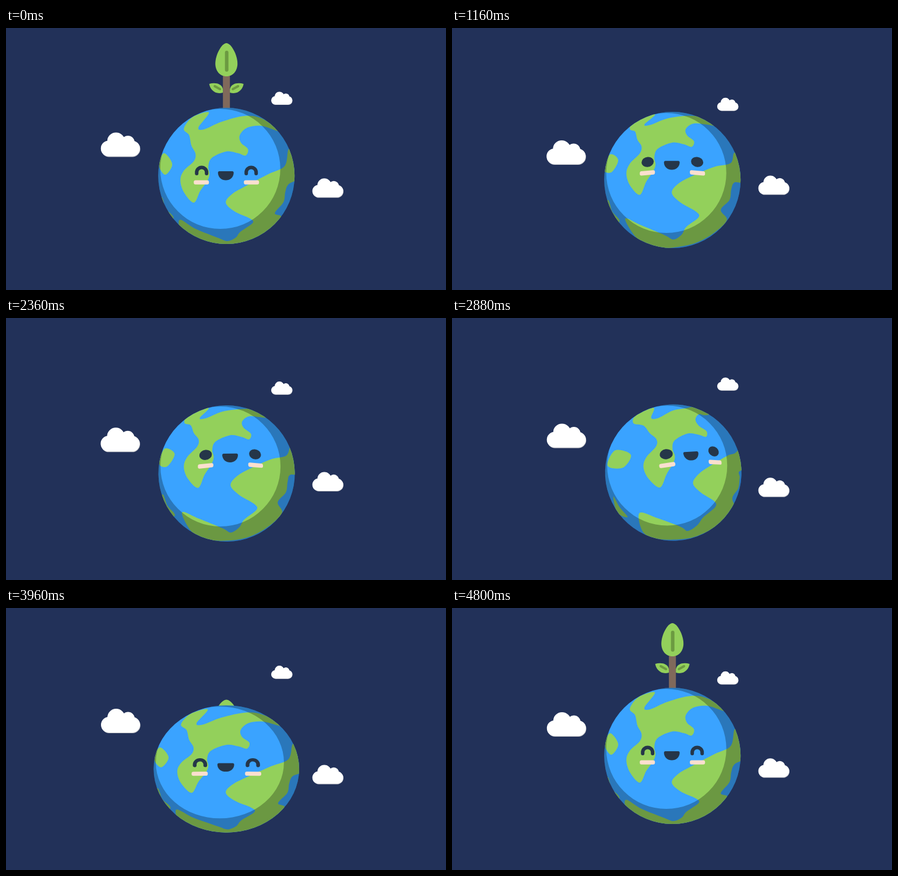
An HTML page with a canvas that plays this animation: 755x450 px, repeating every 4840 ms.

```html
<!DOCTYPE html>
<html lang="en">
<head>
<meta charset="utf-8">
<title>Happy planet</title>
<style>
  html, body { margin: 0; width: 100%; height: 100%; overflow: hidden; background: #223159; }
  canvas { display: block; }
</style>
</head>
<body>
<canvas id="stage" width="755" height="450"></canvas>
<script>
const ctx = document.getElementById('stage').getContext('2d');
const LOOP = 4840, R = 117, RAD = Math.PI / 180, TAU = 2 * Math.PI;
const GREEN = '#93d05b', DARK_GREEN = '#6c9a41', INK = '#253649';

// Coastlines as x, y pairs from the planet's centre; beyond R they lie on the far side.
const north = [-30,-109, -58,-101, -73,-81, -64,-70, -60,-52, -53,-38, -56,-25, -73,-9, -79,7,
  -73,28, -56,46, -45,26, -33,9, -29,-3, -31,-16, -25,-31, 0,-42, 20,-39, 33,-35, 37,-46,
  25,-57, 23,-70, 36,-83, 60,-86, 90,-77, 62,-98, 32,-103, -8,-93, -38,-80, -48,-83];
const south = [-1,46, 10,31, 34,17, 72,-3, 100,-17, 107,-46, 120,-36, 129,0, 107,14, 101,28,
  98,45, 83,64, 94,71, 72,94, 43,112, 10,122, -40,140, -72,115, -81,76, -53,91, -13,107,
  2,112, 16,106, 24,96, 45,81, 40,73, 14,61];
const island = [-93,-20, -105,-2, -116,-19, -107,-39];
const cape = [-114,36, -104,56, -92,74, -140,80];
const LANDS = [north, south, island, cape]
  .map(flat => flat.flatMap((x, i) => i % 2 ? [] : [[x, flat[i + 1]]]));

// Keyframes as [time, value]; every track starts and ends the loop at its rest value.
const rest = (value, ...keys) => [[0, value], ...keys, [LOOP, value]];
const height = rest(0, [560,0], [720,-29], [800,-36], [980,29], [1140,7], [1800,7.5], [2340,13],
  [2880,11.5], [3280,13], [3640,.5], [3840,47], [3920,40], [4060,-30], [4200,12], [4360,-3], [4500,0]);
const squashing = rest(0, [720,0], [980,.05], [1120,0], [3440,0], [3640,.029], [3920,.1],
  [4060,-.06], [4200,.045], [4360,-.01], [4480,0]);
const pitching = rest(0, [560,0], [840,12], [980,4], [1200,13], [3180,13], [3460,0], [3920,0],
  [4060,6], [4240,1.5], [4400,0]);
const turning = rest(0, [1160,0], [1480,-16.5], [2150,-16.5], [2520,17], [3180,17], [3460,0]);
const tilting = rest(0, [4060,0], [4240,-3], [4400,1.5], [4560,0]);
const stretching = rest(1, [560,1], [720,1.2], [800,1.35], [3920,.9], [4060,1.14], [4180,.95], [4240,1]);
const lifting = rest(0, [740,0], [920,320], [3920,-130], [4040,0]);
const drifting = rest(291.5, [720,290], [1400,285.5], [1800,286], [2880,307.5], [3640,307.5], [4240,297]);

// Smooth interpolation that never overshoots a key.
function track(keys, t) {
  let i = 0;
  while (i < keys.length - 2 && t >= keys[i + 1][0]) i++;
  const rise = j => keys[j + 1] && keys[j] ? (keys[j + 1][1] - keys[j][1]) / (keys[j + 1][0] - keys[j][0]) : 0;
  const slope = (a, b) => a * b > 0 ? 2 * a * b / (a + b) : 0;
  const [t0, v0] = keys[i], [t1, v1] = keys[i + 1], d = t1 - t0, u = (t - t0) / d;
  const m0 = slope(rise(i - 1), rise(i)) * d, m1 = slope(rise(i), rise(i + 1)) * d;
  const e = u * u * (3 - 2 * u);
  return v0 + (v1 - v0) * e + m0 * u * (1 - u) ** 2 - m1 * u * u * (1 - u);
}

// Returns a function that turns a surface point and flattens it to the disc.
function makeProjector(pitch, yaw) {
  const cp = Math.cos(pitch), sp = Math.sin(pitch), cy = Math.cos(yaw), sy = Math.sin(yaw);
  return ([px, py]) => {
    const r = Math.hypot(px, py) / R || 1e-6;
    const angle = r <= 1 ? Math.asin(r) : Math.PI / 2 + r - 1;
    const k = Math.sin(angle) / (r * R), z0 = Math.cos(angle);
    const y = py * k * cp - z0 * sp, z1 = z0 * cp + py * k * sp;
    const x = px * k * cy + z1 * sy, z = z1 * cy - px * k * sy;
    const push = z < 0 ? R * (1 - z) / Math.hypot(x, y) : R;
    return [x * push, y * push];
  };
}

function circle(x, y, r) {
  ctx.moveTo(x + r, y);
  ctx.arc(x, y, r, 0, TAU);
}

function fillSmooth(points) {
  const n = points.length, at = i => points[(i + n) % n];
  ctx.beginPath();
  ctx.moveTo(...points[0]);
  for (let i = 0; i < n; i++) {
    const [a, b, c, d] = [at(i - 1), at(i), at(i + 1), at(i + 2)];
    ctx.bezierCurveTo(b[0] + (c[0] - a[0]) / 6, b[1] + (c[1] - a[1]) / 6,
      c[0] - (d[0] - b[0]) / 6, c[1] - (d[1] - b[1]) / 6, c[0], c[1]);
  }
  ctx.fill();
}

function stroke(path, color, width) {
  ctx.strokeStyle = color;
  ctx.lineWidth = width;
  ctx.lineCap = ctx.lineJoin = 'round';
  ctx.stroke(new Path2D(path));
}

function fill(path, color) {
  ctx.fillStyle = color;
  ctx.fill(new Path2D(path));
}

function drawPlant(lift, stretch, lean) {
  ctx.save();
  ctx.translate(0, 1 - R - lift);
  ctx.rotate(lean);
  ctx.scale(1, stretch);
  fill('M-6-60H6V22H-6Z', '#80695b');
  for (const side of [-1, 1]) {
    ctx.save();
    ctx.scale(side, 1);
    fill('M6-33C8-43 20-45 29.5-42C28-32 19-23 6-27Z', GREEN);
    stroke('M11-33L20-38', DARK_GREEN, 4);
    ctx.restore();
  }
  fill('M0-112C8-112 19-92 19-77C19-64 11-55 0-55C-11-55-19-64-19-77C-19-92-8-112 0-112Z', GREEN);
  stroke('M.5-96V-66', DARK_GREEN, 6);
  ctx.restore();
}

function drawFace(mood, project) {
  const place = (x, y, draw) => {
    const [ox, oy] = project([x, y]), [ax, ay] = project([x + 1, y]), [bx, by] = project([x, y + 1]);
    ctx.save();
    ctx.transform(ax - ox, ay - oy, bx - ox, by - oy, ox, oy);
    draw();
    ctx.restore();
  };
  for (const side of [-1, 1]) {
    place(side * 43, 11, () => {
      ctx.beginPath();
      ctx.roundRect(-13, -3.6, 26, 7.4, 3);
      ctx.fillStyle = '#fbdfcf';
      ctx.fill();
    });
    place(side * 42.5, -8, () => {
      if (mood === 'happy') stroke('M-8.5 4V2A8.5 8.5 0 0 1 8.5 2V4', INK, 6);
      else if (mood === 'angry') stroke(`M${side * 13.5}-6.5L${-side * 13.5} 5.5`, INK, 6);
      else fill('M-10.5 0A10.5 9 0 0 1 10.5 0A10.5 9 0 0 1-10.5 0Z', INK);
    });
  }
  place(-1, 0, () => {
    if (mood === 'angry') stroke('M-11.5 7.5C-7-7 7-7 11.5 7.5', INK, 6);
    else fill('M-11-8H11Q13.5-8 13.5-5C13 3 7 7.5 0 7.5C-7 7.5-13 3-13.5-5Q-13.5-8-11-8Z', INK);
  });
}

function drawPlanet(t) {
  const yaw = track(turning, t), squash = track(squashing, t), tilt = track(tilting, t);
  const roll = (tilt - yaw * .2) * RAD;
  const project = makeProjector(track(pitching, t) * RAD, yaw * RAD);
  const mood = t < 860 || t >= 3940 ? 'happy' : t < 3420 ? 'puzzled' : 'angry';

  ctx.save();
  ctx.translate(378.2 + yaw * .09, 254 + track(height, t));
  ctx.scale(1 + squash, 1 - squash);
  ctx.rotate(roll);
  if (t < 920 || t >= 3930) drawPlant(track(lifting, t), track(stretching, t), -tilt * .75 * RAD);

  ctx.save();
  ctx.beginPath();
  circle(0, 0, R);
  ctx.fillStyle = '#3aa3ff';
  ctx.fill();
  ctx.clip();
  ctx.fillStyle = GREEN;
  for (const land of LANDS) fillSmooth(land.map(project));
  ctx.rotate(-roll);
  ctx.beginPath();
  circle(0, 0, R + 2);
  circle(-10.5, -12, 103);
  ctx.fillStyle = 'rgba(0,0,0,.27)';
  ctx.fill('evenodd');
  ctx.restore();

  drawFace(mood, project);
  ctx.restore();
}

function drawCloud(x, bottom, size) {
  ctx.save();
  ctx.translate(x, bottom);
  ctx.scale(size, size);
  for (const [shift, color] of [[0, '#c3c4c8'], [-1, '#fff']]) {
    ctx.beginPath();
    ctx.roundRect(-33.5 + shift * .6, -27 + shift, 67, 27, 13.5);
    circle(-7.5 + shift * .6, -26 + shift, 15);
    circle(13 + shift * .6, -24.5 + shift, 11);
    ctx.fillStyle = color;
    ctx.fill();
  }
  ctx.restore();
}

function draw(t) {
  const wave = peak => Math.cos((t - peak) / LOOP * TAU);
  ctx.fillStyle = '#223159';
  ctx.fillRect(0, 0, 755, 450);
  drawPlanet(t);
  drawCloud(196.7 - wave(1520) * .4, 225.5 + 10.5 * wave(1520), 1);
  drawCloud(552.6, track(drifting, t), .79);
  drawCloud(473.5, 131.5 + 11 * wave(1170), .54);
}

const start = performance.now();
(function frame() {
  draw((performance.now() - start) % LOOP);
  requestAnimationFrame(frame);
})();
</script>
</body>
</html>
```
